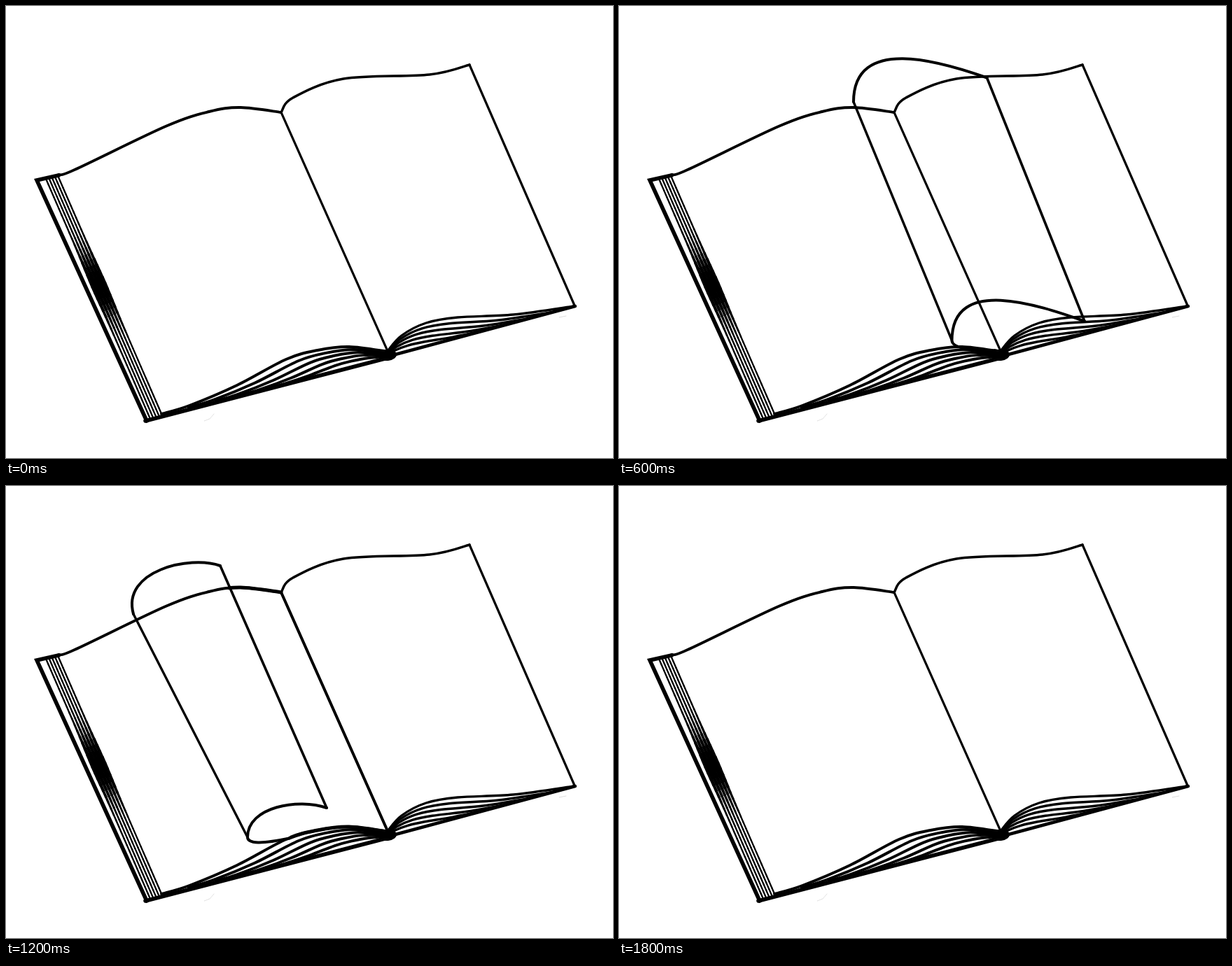
An HTML page with a canvas that plays this animation: 867 px wide and 646 px high, repeating every 1.9 s.

```html
<!DOCTYPE html>
<html lang="en">
<head>
<meta charset="utf-8">
<title>Turning page</title>
<style>
html, body { margin: 0; width: 100%; height: 100%; overflow: hidden; background: #fff; }
canvas { display: block; }
</style>
</head>
<body>
<canvas id="stage" width="867" height="646"></canvas>
<script>
const ctx = document.getElementById('stage').getContext('2d');
const STEP = 100, STEPS = 19, SHEETS = 5;

const topLeft = [[75,241], [98,234], [228,172], [290,151], [335,145], [393,152]];
const topRight = [[393,152], [410,131], [482,104], [605,98], [662,84]];
const bottomLeft = [[222,583], [262,571], [330,542], [400,505], [445,492], [490,487], [545,494]];
const bottomRight = [[545,493], [565,471], [600,453], [645,445], [725,441], [812,429]];
const spine = [[393,152], [545,493]];
const leftCover = [[199,593], [545,503]];
const rightCover = [[545,501], [813,429]];

// Key poses of the turning leaf: its free edge and its fold, each from top to foot.
const poses = [
  { at: 0,  edge: [[662,84], [812,429]],  fold: spine },
  { at: 4,  edge: [[569,102], [718,441]], fold: [[359,127], [511,470]] },
  { at: 8,  edge: [[482,103], [612,460]], fold: [[311,147], [440,486]] },
  { at: 10, edge: [[408,134], [555,481]], fold: [[251,163], [400,499]] },
  { at: 12, edge: [[306,114], [458,460]], fold: [[182,183], [345,502]] },
  { at: 14, edge: [[199,157], [370,497]], fold: [[145,234], [308,526]] },
  { at: 17, edge: [[70,218], [232,553]],  fold: [[64,242], [224,559]] }
];

const lerp = (a, b, k) => a + (b - a) * k;
const mix = (p, q, k) => [lerp(p[0], q[0], k), lerp(p[1], q[1], k)];

function stroke(width, color = '#000') {
  ctx.lineWidth = width;
  ctx.strokeStyle = color;
  ctx.stroke();
}

function line(points, width, color) {
  ctx.beginPath();
  points.forEach(p => ctx.lineTo(...p));
  stroke(width, color);
}

// Smooth line through all points.
function curve(points, width, color) {
  const at = i => points[Math.max(0, Math.min(points.length - 1, i))];
  const handle = (i, side) =>
    [0, 1].map(axis => at(i)[axis] + side * (at(i + 1)[axis] - at(i - 1)[axis]) / 6);
  ctx.beginPath();
  ctx.moveTo(...points[0]);
  for (let i = 1; i < points.length; i++) {
    ctx.bezierCurveTo(...handle(i - 1, 1), ...handle(i, -1), ...at(i));
  }
  stroke(width, color);
}

function yAt(points, x) {
  const found = points.findIndex(p => p[0] >= x);
  const i = Math.max(1, found);
  const [a, b] = [points[i - 1], points[i]];
  return lerp(a[1], b[1], (x - a[0]) / (b[0] - a[0]));
}

// Each deeper sheet is a shorter, flatter copy of the page above the cover line.
function drawSheets(page, cover, width) {
  const [[x0, y0], [x1, y1]] = cover;
  const coverY = x => lerp(y0, y1, (x - x0) / (x1 - x0));
  for (let i = 0; i < SHEETS; i++) {
    curve(page.map(([x, y]) => {
      const sheetX = 545 + (x - 545) * (1 - 0.12 * i);
      return [sheetX, coverY(sheetX) + (y - coverY(x)) * (1 - 0.19 * i)];
    }), width);
  }
}

// Page edges beside the left cover, swelling together around the middle.
function drawPageEdges() {
  const parts = 40;
  for (let i = 0; i < SHEETS; i++) {
    const top = [57 + 4.3 * i, 247 - i], foot = [206 + 4 * i, 590 - 1.8 * i];
    for (let n = 0; n < parts; n++) {
      const t = n / parts;
      const swell = Math.exp(-(((t - 0.44) / 0.13) ** 2));
      line([mix(top, foot, t), mix(top, foot, t + 1 / parts)], 2.3 + 3 * swell);
    }
  }
}

function drawBook() {
  curve(topLeft, 3.9);
  curve(topRight, 3.5);
  line([[662,84], [812.5,429]], 3.2);
  line(spine, 3.1);

  drawPageEdges();
  line([[75,242], [44,249], [201,593]], 5.6);
  line(leftCover, 5.5);
  line(rightCover, 4.5);
  drawSheets(bottomLeft, leftCover, 4);
  drawSheets(bottomRight, rightCover, 3.4);

  ctx.beginPath();
  ctx.ellipse(545, 499, 13, 8, -0.1, 0, 2 * Math.PI);
  ctx.fill();
  line([[283,593], [291,590], [297,583]], 1, '#e2e2e2');
  line([[790,445], [800,443]], 1, '#dedede');
}

function poseAt(step) {
  const i = poses.findIndex(pose => pose.at >= step);
  const a = poses[i - 1], b = poses[i];
  const k = (step - a.at) / (b.at - a.at);
  const between = part => a[part].map((p, n) => mix(p, b[part][n], k));
  return { edge: between('edge'), fold: between('fold') };
}

// Rolled paper from the free edge over to the fold, sized by the gap between them.
function curlTo([edgeX, edgeY], [foldX, foldY], lift, tilt, lean) {
  const gap = edgeX - foldX;
  ctx.beginPath();
  ctx.moveTo(edgeX, edgeY);
  ctx.bezierCurveTo(edgeX - 0.35 * gap, edgeY - tilt * gap,
    foldX - lean * gap, foldY - lift * gap, foldX, foldY);
}

function rightOf(x, draw) {
  ctx.save();
  ctx.beginPath();
  ctx.rect(x, 0, 867 - x, 646);
  ctx.clip();
  draw();
  ctx.restore();
}

function drawLeaf(step) {
  const { edge, fold } = poseAt(step);
  const late = Math.max(0, step - 10);
  const rise = Math.min(1, 0.3 + 0.15 * step);
  const tilt = 0.21 * Math.sin(Math.PI * (step - 4) / 10);

  curlTo(edge[0], fold[0], 0.5 * rise, tilt, 0.07 * late);
  stroke(4);

  const [footX, footY] = fold[1];
  const joinX = Math.min(footX + 60, 545);
  curlTo(edge[1], fold[1], (0.49 - 0.05 * late) * rise, tilt, 0);
  ctx.quadraticCurveTo(footX, footY + 14, joinX, yAt(bottomLeft, joinX));
  stroke(4);

  line(edge, 3.6);
  line(fold, 3.4);

  // The part of the leaf already resting on the left page thickens its outline.
  rightOf(joinX, () => curve(bottomLeft, 5));
  if (late) {
    rightOf(edge[0][0] + 11, () => curve(topLeft, 5));
    line(spine, 4);
  }
}

function frame(now) {
  const step = Math.floor(now / STEP) % STEPS;
  ctx.fillStyle = '#fff';
  ctx.fillRect(0, 0, 867, 646);
  ctx.fillStyle = '#000';
  ctx.lineCap = 'round';
  ctx.lineJoin = 'miter';
  drawBook();
  if (step > 0 && step < STEPS - 1) drawLeaf(step);
}

const start = performance.now();
function tick() {
  frame(performance.now() - start);
  requestAnimationFrame(tick);
}
tick();
</script>
</body>
</html>
```
